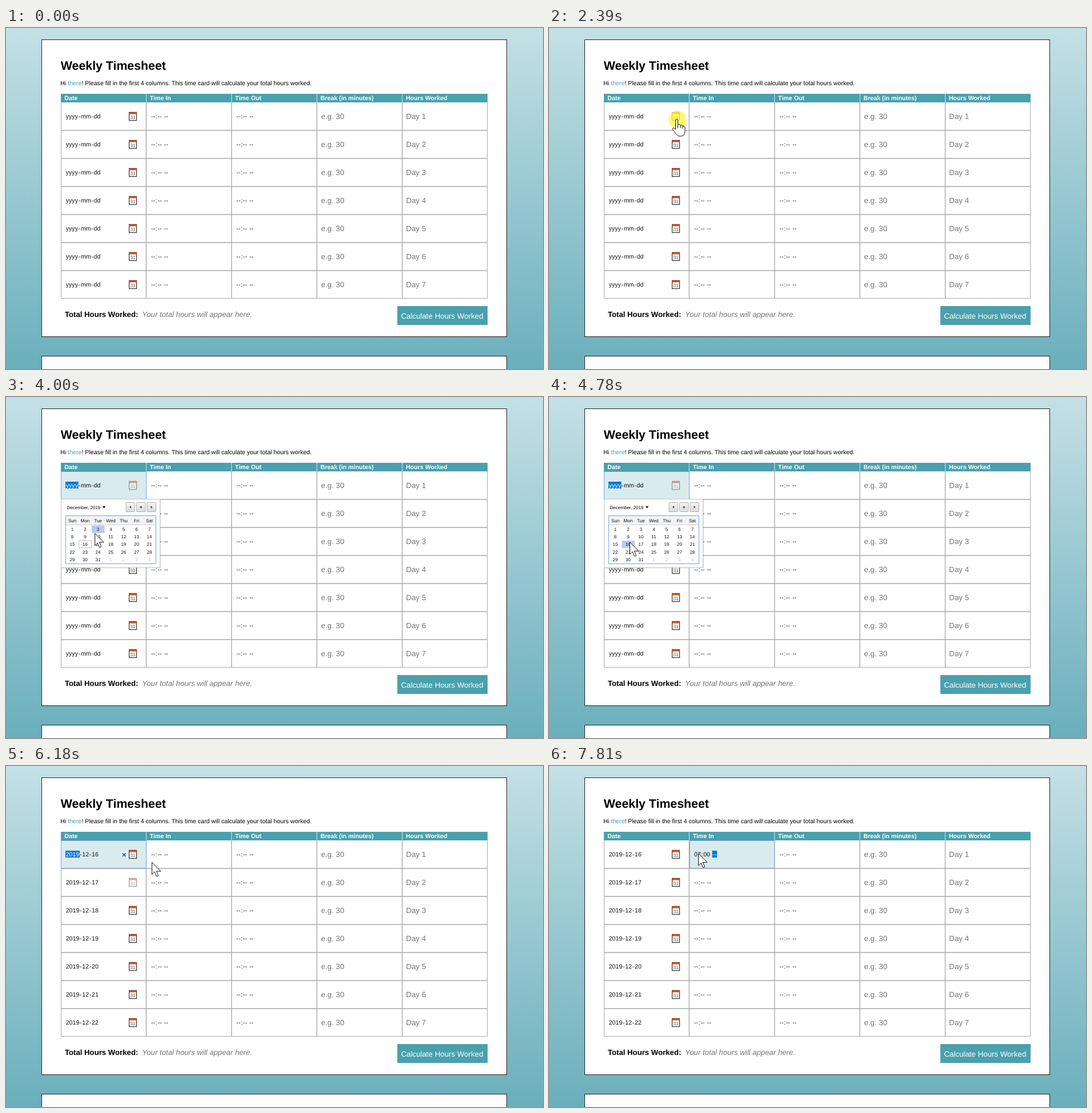
Animation, 940 px wide and 596 px high, one loop 8000 ms. Source, as an HTML page:

```html
<!DOCTYPE html>
<html lang="en">
<head>
<meta charset="utf-8">
<title>Weekly Timesheet</title>
<style>
html, body { margin: 0; height: 100%; overflow: hidden; }
svg { display: block; width: 100vw; height: 100vh; }
text { font-family: "Liberation Sans", Arial, sans-serif; text-rendering: geometricPrecision; white-space: pre; }
</style>
</head>
<body>
<svg id="stage" viewBox="0 0 940 596"></svg>
<script>
const TEAL = '#4aa0ad', LINE = '#a9a9a9', HINT = '#757575', BLUE = '#0078d7';
const LOOP = 8000, TOP = 130, ROW = 49, COL = 149.4;
const ROWS = [0, 1, 2, 3, 4, 5, 6];
const OPENED = 2690, PICKED = 4870, TIME_FOCUS = 6720;

const rect = (x, y, w, h, fill, more = '') =>
  `<rect x="${x}" y="${y}" width="${w}" height="${h}" fill="${fill}" ${more}/>`;
const path = (d, more) => `<path d="${d}" ${more}/>`;
const text = (x, y, size, s, fill = '#000', more = '') =>
  `<text x="${x}" y="${y}" font-size="${size}" fill="${fill}" ${more}>${s}</text>`;
const between = (t, a, b) => t >= a && t < b;
const clamp = v => Math.max(0, Math.min(1, v));

// Cursor moves: first step, last step, step count, end point, ease-out power
const MOVES = [
  [740, 740, 1, 589, 473, 1],
  [825, 910, 2, 456, 363, 1],
  [1210, 1210, 1, 336, 306, 1],
  [1290, 1530, 4, 202, 201, 1.8],
  [1690, 2150, 7, 224, 159, 1.5],
  [3460, 3460, 1, 215, 173, 1],
  [3538, 4240, 10, 141, 253, 1.8],
  [5560, 6330, 11, 260, 164, 1.86],
  [6400, 6560, 3, 261, 152, 1]
];
const CLICKS = [[2390, 2490], [4640, 4780], [6560, 6720]];
// Dimmed calendar icons: row, start, end
const DIMS = [[0, 1960, 5010], [1, 1690, 2000], [2, 5010, 5700], [1, 5800, 6210]];

function cursorAt(t) {
  let x = 640, y = 515;
  for (const [a, b, n, toX, toY, power] of MOVES) {
    if (t < a) break;
    const k = n > 1 ? Math.min(n - 1, Math.floor((t - a) / (b - a) * (n - 1) + .001)) : 0;
    const u = 1 - (1 - (k + 1) / n) ** power;
    x += (toX - x) * u;
    y += (toY - y) * u;
  }
  return [x, y];
}

function page() {
  let s = `<defs>
    <linearGradient id="sky" x2="0" y2="1"><stop stop-color="#c4e0e5"/><stop offset="1" stop-color="#6aafbc"/></linearGradient>
    <linearGradient id="key" x2="0" y2="1"><stop stop-color="#f6f6f6"/><stop offset="1" stop-color="#dadada"/></linearGradient>
    </defs>` + rect(0, 0, 940, 596, 'url(#sky)');
  s += rect(62.5, 20.5, 814, 519, '#fff', 'stroke="#222"') + rect(62.5, 573.5, 814, 60, '#fff', 'stroke="#222"');
  s += text(95.8, 73, 21.33, 'Weekly Timesheet', '#000', 'font-weight="700"');
  s += text(95.3, 100, 10.62, `Hi <tspan fill="${TEAL}">there</tspan>! Please fill in the first 4 columns. ` +
    'This time card will calculate your total hours worked.');
  s += rect(96, 115, 747, 15, TEAL);
  ['Date', 'Time In', 'Time Out', 'Break (in minutes)', 'Hours Worked'].forEach((h, i) => {
    s += text(102.3 + i * COL, 126, 10.67, h, '#fff', 'font-weight="700"');
    if (i) s += rect(95.5 + i * COL, 115, 1, 15, '#d5e8eb');
  });
  for (const r of ROWS) {
    const y = TOP + r * ROW;
    s += text(551.4, y + 29, 13.33, 'e.g. 30', HINT) + text(700.3, y + 29, 13.33, 'Day ' + (r + 1), HINT);
    if (r) s += path(`M96 ${y}H843`, `stroke="${LINE}" stroke-width="1.4"`);
  }
  for (let i = 1; i < 5; i++) s += path(`M${96 + i * COL} 130V473`, `stroke="${LINE}" stroke-width="1.4"`);
  s += path('M96.5 130V472.5H842.5V130', `fill="none" stroke="${LINE}"`);
  s += text(102.9, 505, 13.2, 'Total Hours Worked:', '#000', 'font-weight="700"');
  s += text(238.2, 505, 13.2, 'Your total hours will appear here.', HINT, 'font-style="italic"');
  s += rect(685, 486, 158, 33, TEAL) + text(691.5, 507.5, 13.3, 'Calculate Hours Worked', '#fff');
  return s + '<g id="live"></g>';
}

const WIDTHS = { y: .5, m: .833, '-': .333, ':': .278, ' ': .278 };

// Parts alternate between editable segments and separators
function field(x, y, parts, selected) {
  let s = '';
  parts.forEach((p, i) => {
    const pad = i % 2 ? 0 : .67, on = i === selected;
    const w = 10.67 * [...p].reduce((sum, c) => sum + (WIDTHS[c] ?? .556), 0) + 2 * pad;
    if (on) s += rect(x, y - 10, w, 12, BLUE);
    s += text(x + pad, y, 10.67, p, on ? '#fff' : '#111');
    x += w;
  });
  return s;
}

const focusBox = (x, w) => rect(x, 130.5, w, 48, '#daebee', 'stroke="#7fa3dc"');

const icon = (y, alpha) => `<g opacity="${alpha.toFixed(2)}">` +
  rect(215.6, y + 17.6, 12.9, 13.9, '#fff', 'stroke="#3a3a3a" stroke-width="1.3"') +
  rect(215.6, y + 17.4, 12.9, 3.2, '#d9531c') +
  path(`M215 ${y + 17.2}H229`, 'stroke="#7a3315" stroke-width=".7"') +
  text(222.1, y + 29.2, 8.4, '31', '#555', 'text-anchor="middle"') + '</g>';

const clearMark = y => path(`M204.2 ${y + 22.6}l5.2 5.2m0-5.2l-5.2 5.2`, 'stroke="#2c5c98" stroke-width="1.7"');

function timeField(t) {
  if (t < TIME_FOCUS) return [['--', ':', '--', ' ', '--'], -1];
  if (t < 7500) return [['--', ':', '--', ' ', '--'], 0];
  if (t < 7660) return [['07', ':', '--', ' ', '--'], 2];
  return [['07', ':', '00', ' ', '--'], t < 7810 ? 2 : 4];
}

function calendar(cx, cy) {
  const mid = 'text-anchor="middle"';
  let s = rect(98, 179, 173, 120.5, '#000', 'opacity=".1"') + rect(96.5, 178.5, 173, 119.5, '#fff', 'stroke="#c4c4c4"');
  s += text(106.6, 195.5, 8, 'December, 2019') + path('M169 191h5.4l-2.7 3.4z', '');
  for (const x of [210, 228.5, 247]) s += rect(x, 184.5, 15.5, 16, 'url(#key)', 'stroke="#b0b0b0" rx="1"');
  s += path('M219 190v5l-3-2.500zM253.500 190v5l3-2.500z', 'fill="#444"') + '<circle cx="236.300" cy="192.500" r="2" fill="#4d7a6c"/>';
  s += rect(104.5, 207.5, 158, 84, '#fff', 'stroke="#6fa5ec"') + rect(105, 208, 157, 15.5, '#f3f3f3') + rect(105, 223, 157, .8, '#c8c8c8');
  ['Sun', 'Mon', 'Tue', 'Wed', 'Thu', 'Fri', 'Sat'].forEach((d, c) => s += text(116 + c * 22.5, 218.6, 8, d, '#111', mid));
  const hotCol = Math.floor((cx - 105) / 22.5), hotRow = Math.floor((cy - 224.5) / 13.2);
  for (let i = 0; i < 35; i++) {
    const c = i % 7, r = Math.floor(i / 7), x = 105 + c * 22.5, y = 224.5 + r * 13.2;
    if (c === hotCol && r === hotRow) s += rect(x, y, 22.5, 13.2, '#bbcaef');
    else if (i === 15) s += rect(x + .1, y + .1, 22, 12.8, '#fff', 'stroke="#bdbdbd"');
    s += text(116 + c * 22.5, 234 + r * 13.2, 8, i % 31 + 1, i < 31 ? '#111' : '#afc6c8', mid);
  }
  return s;
}

const ARROW = path('M.5 .8V22L5.200 17.500L8.600 25.500L11.700 24.200L8.400 16.300H16Z', 'fill="#fff" stroke="#111"');
const HAND = path('M-2.500 2Q-2.500 .5 -.5 .5T1.500 2V11Q2 9.500 4 9.500T6 11.500Q6.500 10.500 8 10.500T10 13Q10.500 12 12 12.200T14 15V21' +
  'Q14 30 7 30H4Q1 30 -1 26.500L-7 19.500Q-8.500 17 -7 16T-4 17L-2.500 18.500ZM1.500 11V16M6 11.500V16M10 13V17', 'fill="#fff" stroke="#111"');
const BEAM = path('M-4 -9.500H-1Q0 -9.500 0 -8Q0 -9.500 1 -9.500H4M0 -8V9M-4 10.500H-1Q0 10.500 0 9Q0 10.500 1 10.500H4', 'fill="none" stroke="#111" stroke-width="1.2"');

function shape(x, y, t) {
  const inRow = (y - TOP) % ROW;
  if (x >= 213 && x < 231 && between(inRow, 16, 34)) return HAND;
  const covered = between(t, OPENED, PICKED);
  return !covered && between(y, TOP, 473) && between(x, 195, 213) ? BEAM : ARROW;
}

function draw(t) {
  const [x, y] = cursorAt(t), filled = t >= PICKED;
  const dateFocus = between(t, 2490, TIME_FOCUS);
  const hover = x < 245 ? Math.floor((y - TOP) / ROW) : -1;
  let s = '';
  if (dateFocus) s += focusBox(96.5, 149);
  if (t >= TIME_FOCUS) s += focusBox(246.5, 148);
  for (const r of ROWS) {
    const top = TOP + r * ROW, focus = dateFocus && r === 0;
    const date = filled ? ['2019', '-', '12', '-', String(16 + r)] : ['yyyy', '-', 'mm', '-', 'dd'];
    s += field(104, top + 28, date, focus ? 0 : -1);
    s += field(253.3, top + 28, ...(r ? timeField(0) : timeField(t)));
    s += field(402.7, top + 28, ...timeField(0));
    if (filled && (focus || r === hover)) s += clearMark(top);
    let alpha = 1;
    for (const [row, a, b] of DIMS)
      if (row === r) alpha -= .5 * (clamp((t - a) / 90) - clamp((t - b) / 90));
    s += icon(top, alpha);
  }
  if (between(t, OPENED, PICKED)) s += calendar(x, y);
  if (CLICKS.some(([a, b]) => between(t, a, b))) s += `<circle cx="${x + 1}" cy="${y + 1}" r="15.700" fill="#fbf714" opacity=".6"/>`;
  if (t >= 740) s += `<g transform="translate(${x.toFixed(1)} ${y.toFixed(1)})">${shape(x, y, t)}</g>`;
  return s;
}

document.getElementById('stage').innerHTML = page();
const live = document.getElementById('live');
let shown = '';
function tick() {
  const next = draw(performance.now() % LOOP);
  if (next !== shown) live.innerHTML = shown = next;
  requestAnimationFrame(tick);
}
tick();
</script>
</body>
</html>
```
